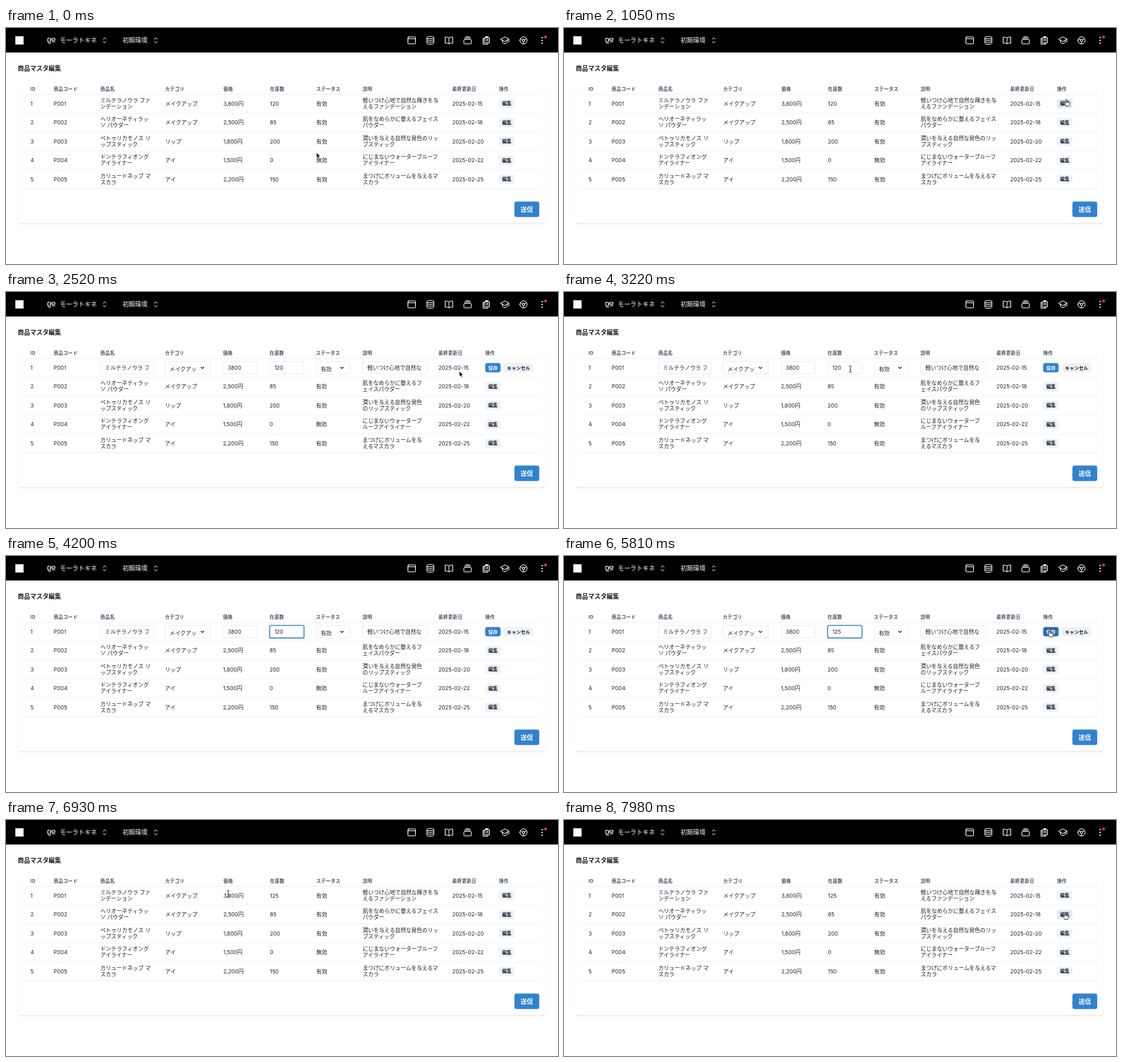
Write an HTML page that moves like this. It is 800 by 343 pixels and loops after 8 s.

```html
<!DOCTYPE html>
<html lang="ja">
<head>
<meta charset="utf-8">
<title>商品マスタ編集</title>
<style>
html, body { margin: 0; width: 100%; height: 100%; overflow: hidden; background: #fff; }
svg { display: block; }
text { font-family: Inter, "Noto Sans CJK JP", "Noto Sans CJK", sans-serif; white-space: pre; }
</style>
</head>
<body>
<svg id="stage" width="800" height="343" viewBox="0 0 800 343"></svg>
<script>
const LOOP = 8000, STEP = 70;
const EDIT_AT = 1750, FOCUS_AT = 3640, ERASE_AT = 4620, TYPE_AT = 4760, SAVE_AT = 6090;
const HIDE_AT = 4130, SHOW_AT = 5250;
const INK = '#1a202c', GRAY = '#edf2f7', GRAY_HOVER = '#e2e8f0', BLUE = '#3182ce', BLUE_HOVER = '#2b6cb0';
const BODY = 7.85, SMALL = 6.73;

const stage = document.getElementById('stage');

function add(parent, tag, attrs = {}) {
  const el = document.createElementNS('http://www.w3.org/2000/svg', tag);
  for (const k in attrs) el.setAttribute(k, attrs[k]);
  parent.append(el);
  return el;
}
const rect = (p, x, y, width, height, attrs) => add(p, 'rect', { x, y, width, height, ...attrs });
const path = (p, d, attrs) => add(p, 'path', { d, fill: 'none', ...attrs });

// y is the vertical middle of the line
function label(p, str, x, y, size = BODY, attrs = {}) {
  const el = add(p, 'text', { x, y: y + size * 0.37, 'font-size': size, fill: INK, ...attrs });
  el.textContent = str;
  return el;
}

// Top bar
rect(stage, 0, 0, 800, 35.6, { fill: '#000' });
rect(stage, 13.5, 12, 12, 12, { fill: '#fff' });
const bar = { fill: '#fff', 'font-weight': 500 };
label(stage, 'モーラトキネ', 78, 18, 8.98, bar);
label(stage, '初期環境', 169, 18, 8.98, bar);

function icon(x, d, width = 1) {
  path(stage, d, {
    transform: `translate(${x} 18)`, stroke: '#fff', 'stroke-width': width,
    'stroke-linejoin': 'round', 'stroke-linecap': 'round'
  });
}
icon(66, 'M-5-3H-1.5V2H-5ZM1-3H5V0H1ZM1 2H5M-5 4H-1M-1.5-.5H1');
const UP_DOWN = 'M-2-1.7L0-3.7L2-1.7M-2 1.7L0 3.7L2 1.7';
icon(143, UP_DOWN);
icon(217, UP_DOWN);
[
  'M-4.5-5H4.5Q5.5-5 5.5-4V4Q5.5 5 4.5 5H-4.5Q-5.5 5-5.5 4V-4Q-5.5-5-4.5-5ZM-5.5-2.3H5.5',
  'M-5-4C-5-6.3 5-6.3 5-4C5-1.7-5-1.7-5-4V4C-5 6.3 5 6.3 5 4V-4M-5-1.3C-5 1 5 1 5-1.3M-5 1.4C-5 3.7 5 3.7 5 1.4',
  'M0-3.7C-1.5-4.8-3.5-5-5.5-4.8V4C-3.5 3.8-1.5 4 0 5C1.5 4 3.5 3.8 5.5 4V-4.8C3.5-5 1.5-4.8 0-3.7V5',
  'M-4.5-1.5H4.5Q5.3-1.5 5.3-.7V4.2Q5.3 5 4.5 5H-4.5Q-5.3 5-5.3 4.2V-.7Q-5.3-1.5-4.5-1.5ZM-4.2-3.4H4.2M-3-5.2H3',
  'M-2.5-4H4.5V3.5H-2.5ZM-.5-5.5H2.5V-4H-.5ZM-2.5-2.5H-4.7V5.5H2.3V3.5M-.7-1.5H2.7M-.7 .5H2.7',
  'M-6-1.8L0-5L6-1.8L0 1.4ZM-3.5-.4V3C-1.5 5 1.5 5 3.5 3V-.4M5.8-1.8V2.4',
  'M-5.2 0A5.2 5.2 0 1 1 5.2 0A5.2 5.2 0 1 1-5.2 0ZM-1.7 0A1.7 1.7 0 1 1 1.7 0A1.7 1.7 0 1 1-1.7 0ZM-1.5-.8L-4.6-2.4M1.5-.8L4.6-2.4M0 1.7V5.2'
].forEach((d, i) => icon(588 + 27 * i, d));
icon(777, 'M0-4V-4M0 0V0M0 4V4', 2.1);
add(stage, 'circle', { cx: 782, cy: 13, r: 2.1, fill: '#e53e3e' });

// Card
label(stage, '商品マスタ編集', 17, 59, 8.98, { 'font-weight': 700 });
rect(stage, 17, 76, 765, 208, { fill: '#fff' });
path(stage, 'M17.2 84V282M781.8 84V282', { stroke: '#f7f7f8', 'stroke-width': .8 });
path(stage, 'M18 284.1H781', { stroke: '#dcdcde' });
path(stage, 'M19 285.1H780', { stroke: '#f4f4f5' });
for (let i = 0; i < 6; i++) path(stage, `M26 ${96.4 + 27.45 * i}H774`, { stroke: GRAY, 'stroke-width': .9 });

function makeButton(p, str, x, y, w, h, blue, size = SMALL) {
  const box = rect(p, x, y, w, h, { rx: 3.2 });
  label(p, str, x + w / 2, y + h / 2, size, { 'text-anchor': 'middle', 'font-weight': 600, fill: blue ? '#fff' : INK });
  const hit = (px, py) => px > x && px < x + w && py > y && py < y + h;
  const paint = on => box.setAttribute('fill', blue ? (on ? BLUE_HOVER : BLUE) : (on ? GRAY_HOVER : GRAY));
  paint(false);
  return { hit, paint };
}
makeButton(stage, '送信', 736.8, 252.3, 36, 22.5, true, 8.98);

// Table
const HEAD = ['ID', '商品コード', '商品名', 'カテゴリ', '価格', '在庫数', 'ステータス', '説明', '最終更新日', '操作'];
const VIEW_X = [35.5, 69, 136.7, 230.7, 315, 382.5, 449.8, 517, 646.8, 714.5];
const EDIT_X = [35.5, 69, 136.7, 230.2, 314.5, 382, 449.3, 516.8, 626.8, 694.5];
const TEXT_W = [5, 20, 70, 46, 30, 15, 16, 100, 46];
const ROWS = [
  ['ミルテラノウラ ファ|ンデーション', 'メイクアップ', '3,800円', '120', '有効', '軽いつけ心地で自然な輝きを与えるファンデーション', '15'],
  ['ヘリオーネティラッ|ソ パウダー', 'メイクアップ', '2,500円', '85', '有効', '肌をなめらかに整えるフェイスパウダー', '18'],
  ['ペトゥリカモノス リ|ップスティック', 'リップ', '1,800円', '200', '有効', '潤いを与える自然な発色のリップスティック', '20'],
  ['ドンテラフィオング|アイライナー', 'アイ', '1,500円', '0', '無効', 'にじまないウォータープルーフアイライナー', '22'],
  ['カリュードネップ マ|スカラ', 'アイ', '2,200円', '150', '有効', 'まつげにボリュームを与えるマスカラ', '25']
];
const rowY = i => 110 + 27.45 * i;

function lines(p, list, x, y) {
  if (list.length < 2) return label(p, list[0], x, y);
  list.forEach((s, i) => label(p, s, x, y - .5 + (i - .5) * 9.2));
}

function makeField(p, str, x, w, { pad = 7, select = false } = {}) {
  rect(p, x + .3, 101.2, w, 17.8, { rx: 1.6, fill: '#fff', stroke: GRAY_HOVER, 'stroke-width': .8 });
  const clip = add(p, 'svg', { x: x + 6, y: 101, width: w - 6 - (select ? 18.5 : pad), height: select ? 15 : 18, overflow: 'hidden' });
  if (select) {
    path(p, 'M-2.4-1.2L0 1.2L2.4-1.2', { transform: `translate(${x + w - 11.5} 110)`, stroke: INK, 'stroke-width': 1.2 });
  }
  return label(clip, str, .9, select ? 10.6 : 9.2);
}

function makeTable(editing) {
  const g = add(stage, 'g'), xs = editing ? EDIT_X : VIEW_X, buttons = [];
  const table = { g, xs, buttons };
  HEAD.forEach((s, i) => label(g, s, xs[i], 89, SMALL, { 'font-weight': 700, fill: '#4a5568', 'letter-spacing': .3 }));
  ROWS.forEach(([name, kind, price, stock, status, note, day], r) => {
    const y = rowY(r), open = editing && r === 0, wrap = editing ? 11 : 14;
    label(g, String(r + 1), xs[0], y);
    label(g, 'P00' + (r + 1), xs[1], y);
    label(g, '2025-02-' + day, xs[8], y);
    if (open) {
      makeField(g, name.replace('|', ''), xs[2], 77);
      makeField(g, kind, xs[3], 66, { select: true });
      makeField(g, '3800', xs[4], 49);
      table.stock = makeField(g, stock, xs[5], 49.5);
      makeField(g, status, xs[6], 49, { select: true });
      makeField(g, note.slice(0, 10), xs[7], 94);
      table.ring = rect(g, 382.1, 100.9, 49.8, 18.4, { rx: 1.8, fill: 'none', stroke: BLUE, 'stroke-width': 1.4 });
      buttons.push(makeButton(g, '保存', xs[9], 103.3, 22.3, 13.5, true));
      buttons.push(makeButton(g, 'キャンセル', 721.4, 103.3, 42.8, 13.5, false));
      return;
    }
    lines(g, name.split('|'), xs[2], y);
    label(g, kind, xs[3], y);
    label(g, price, xs[4], y);
    const cell = label(g, stock, xs[5], y);
    if (r === 0) table.stock = cell;
    label(g, status, xs[6], y);
    lines(g, [note.slice(0, wrap), note.slice(wrap)], xs[7], y);
    buttons.push(makeButton(g, '編集', xs[9], y - 6.7, 22.3, 13.4, false));
  });
  return table;
}
const view = makeTable(false), edit = makeTable(true);

// Pointer shapes, drawn around the hot spot
const pointer = add(stage, 'g');
const shapes = {
  arrow: path(pointer, 'M0 0V8L1.9 6.3L3.1 9L4.5 8.4L3.3 5.8H5.7Z', { fill: '#000', stroke: '#fff', 'stroke-width': .6 }),
  beam: path(pointer, 'M-2-4.6Q0-4.6 0-3.6Q0-4.6 2-4.6M0-3.6V3.6M-2 4.6Q0 4.6 0 3.6Q0 4.6 2 4.6M-1 .9H1', { stroke: '#222', 'stroke-width': .8 }),
  hand: path(pointer, 'M-.9 .6Q0-.7 .9 .6V3.2Q1.7 2.6 2.3 3.4Q3.1 2.9 3.7 3.7Q4.9 3.4 5 4.6V6.2Q5 7.6 4.2 8.6V9.7H-.4V8.8L-3 5.6Q-3.2 4.2-1.9 4.7L-.9 5.6ZM.9 3.2V5M2.3 3.4V5M3.7 3.7V5',
    { fill: '#fff', stroke: '#111', 'stroke-width': .7, 'stroke-linejoin': 'round' })
};

const ease = {
  line: k => k,
  in: k => k * k,
  out: k => 1 - (1 - k) ** 3,
  both: k => k * k * (3 - 2 * k)
};
// time, x, y, easing on the way there
const ROUTE = [
  [0, 450, 181],
  [490, 724, 107, 'both'],
  [770, 724, 107],
  [1050, 728, 103.8, 'both'],
  [2380, 728, 103.8],
  [2520, 657, 115, 'in'],
  [3220, 415, 112, 'out'],
  [3360, 415, 112],
  [3500, 414.5, 113.5, 'line'],
  [5180, 414.5, 113.5],
  [5740, 704, 108, 'both'],
  [6090, 704, 108],
  [6650, 385, 109, 'both'],
  [6930, 322, 107, 'both'],
  [7700, 722, 136, 'both'],
  [7980, 726, 134.8, 'out'],
  [8000, 726, 134.8]
];

function locate(t) {
  const i = Math.max(1, ROUTE.findIndex(k => k[0] >= t));
  const [t0, x0, y0] = ROUTE[i - 1], [t1, x1, y1, e = 'line'] = ROUTE[i];
  const k = ease[e]((t - t0) / (t1 - t0));
  return [x0 + (x1 - x0) * k, y0 + (y1 - y0) * k];
}

function overText(table, x, y) {
  return ROWS.some((_, r) => {
    const reach = table === edit && r === 0 && x > 314 && x < 432 ? 9 : 5;
    return Math.abs(y - rowY(r)) < reach &&
      table.xs.some((cx, c) => c < 9 && x >= cx && x <= cx + (reach > 5 ? 49 : TEXT_W[c]));
  });
}

function draw(now) {
  const t = Math.floor(now % LOOP / STEP) * STEP;
  const editing = t >= EDIT_AT && t < SAVE_AT, table = editing ? edit : view;
  view.g.style.display = editing ? 'none' : '';
  edit.g.style.display = editing ? '' : 'none';
  view.stock.textContent = t >= SAVE_AT ? '125' : '120';
  edit.stock.textContent = t < ERASE_AT ? '120' : t < TYPE_AT ? '12' : '125';
  edit.ring.setAttribute('opacity', Math.min(1, Math.max(0, (t - FOCUS_AT + STEP) / 280)));

  const [x, y] = locate(t), shown = t < HIDE_AT || t >= SHOW_AT;
  let hot = false;
  for (const b of table.buttons) {
    const on = shown && b.hit(x, y);
    b.paint(on);
    hot = hot || on;
  }
  const kind = hot ? 'hand' : overText(table, x, y) ? 'beam' : 'arrow';
  for (const k in shapes) shapes[k].style.display = k === kind ? '' : 'none';
  pointer.style.display = shown ? '' : 'none';
  pointer.setAttribute('transform', `translate(${x.toFixed(2)} ${y.toFixed(2)})`);
}

const start = performance.now();
function tick() {
  draw(performance.now() - start);
  requestAnimationFrame(tick);
}
tick();
</script>
</body>
</html>
```
